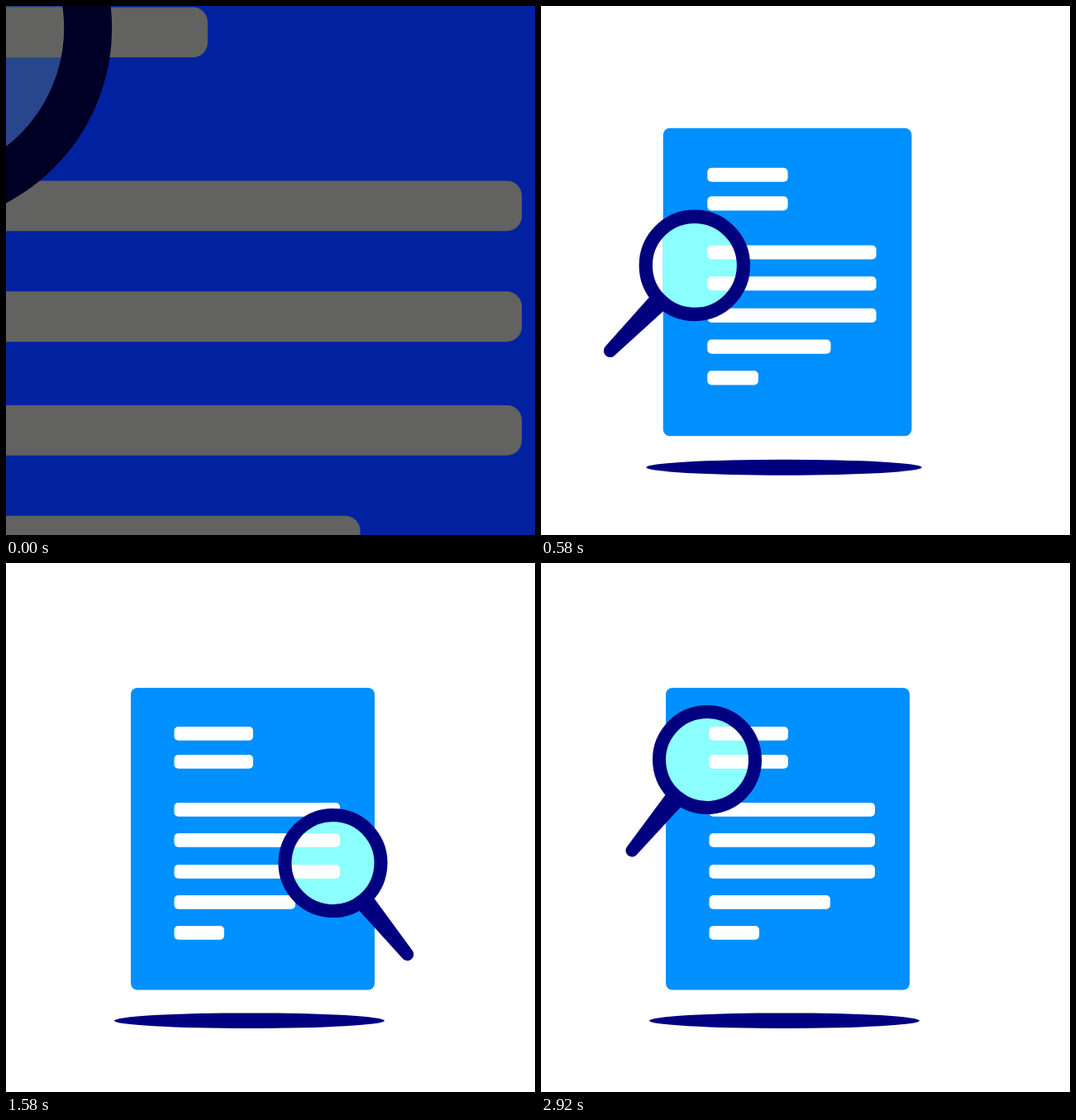
These frames come from a looping animation (640 by 640 pixels, 3010 ms). An HTML page with a canvas:

```html
<!DOCTYPE html>
<html lang="en">
<head>
<meta charset="utf-8">
<title>Document search</title>
<style>
html, body { margin: 0; width: 100%; height: 100%; overflow: hidden; background: #fff; }
canvas { display: block; width: 100vmin; height: 100vmin; }
</style>
</head>
<body>
<canvas id="stage" width="640" height="640"></canvas>
<script>
const ctx = document.getElementById('stage').getContext('2d');
const LOOP = 3010, STEP = 83.33, LAST = 35;

// Text bars: top, width
const bars = [[198, 96], [232, 96], [290, 201], [327, 201], [365, 201], [402, 147], [439, 61]];

// Magnifier poses: step, x, y, handle angle in degrees
const poses = [
  [0, 201, 239, 39.6], [3, 176, 275.5, 43.7], [7, 188.4, 314, 44.7],
  [11, 199.5, 317, 42.9], [14, 376, 345, -31], [17, 399, 360, -40.8],
  [19, 395.5, 363, -39.2], [21, 340, 310, -16], [24, 233, 245, 28],
  [28, 203, 238, 38.5], [35, 201, 238, 39.6]
];

// Colour pairs: lit (may exceed 255 for a quick rise to full), dim
const palette = {
  paper: [[280, 280, 280], [98, 98, 96]],
  sheet: [[0, 144, 271], [0, 34, 160]],
  lens: [[140, 256, 275], [40, 70, 140]],
  ink: [[0, 0, 128], [0, 0, 38]]
};

function slope(i, k) {
  if (i === 0 || i === poses.length - 1) return 0;
  const rate = j => (poses[j + 1][k] - poses[j][k]) / (poses[j + 1][0] - poses[j][0]);
  const a = rate(i - 1), b = rate(i);
  return a * b > 0 ? 2 * a * b / (a + b) : 0;
}

// Monotone cubic interpolation of pose column k
function poseAt(step, k) {
  const i = Math.max(0, poses.findIndex(p => p[0] >= step) - 1);
  const p = poses[i], q = poses[i + 1], span = q[0] - p[0];
  const u = (step - p[0]) / span, v = 1 - u;
  return v * v * (1 + 2 * u) * p[k] + u * u * (3 - 2 * u) * q[k]
    + span * u * v * (v * slope(i, k) - u * slope(i + 1, k));
}

function roundBox(x, y, w, h, r) {
  ctx.beginPath();
  ctx.roundRect(x, y, w, h, r);
  ctx.fill();
}

function draw(step) {
  const intro = step < 9 ? Math.exp(-0.66 * step - 0.006 * step * step) : 0;
  const scale = 1 + 2.62 * intro;
  const color = name => {
    const [lit, dim] = palette[name];
    return `rgb(${lit.map((c, i) => Math.min(255, Math.round(c + (dim[i] - c) * intro)))})`;
  };
  const [x, y, angle] = [1, 2, 3].map(k => poseAt(step, k));

  ctx.setTransform(1, 0, 0, 1, 0, 0);
  ctx.fillStyle = color('paper');
  ctx.fillRect(0, 0, 640, 640);
  ctx.translate(320, 320);
  ctx.scale(scale, scale);
  ctx.translate(-320, -320);

  ctx.fillStyle = color('ink');
  ctx.beginPath();
  ctx.ellipse(294.5, 553.7, 163.5, 9.3, 0, 0, 7);
  ctx.fill();

  ctx.fillStyle = color('sheet');
  roundBox(151, 151, 295, 365.5, 8);

  // The lens tints only the sheet
  ctx.save();
  ctx.beginPath();
  ctx.arc(x, y, 58, 0, 7);
  ctx.clip();
  ctx.fillStyle = color('lens');
  roundBox(151, 151, 295, 365.5, 8);
  ctx.restore();

  ctx.fillStyle = color('paper');
  for (const [top, width] of bars) roundBox(203.5, top, width - 0.5, 16.8, 5);

  ctx.translate(x, y);
  ctx.rotate(angle * Math.PI / 180);
  ctx.fillStyle = ctx.strokeStyle = color('ink');
  ctx.lineWidth = 16;
  ctx.beginPath();
  ctx.arc(0, 0, 58, 0, 7);
  ctx.stroke();
  ctx.beginPath();
  ctx.moveTo(-12, 60);
  ctx.lineTo(12, 60);
  ctx.lineTo(7.7, 142);
  ctx.arc(0, 142.5, 7.7, 0, Math.PI);
  ctx.fill();
}

function tick() {
  const t = performance.now() % LOOP;
  draw(Math.min(LAST, Math.floor((t + 5) / STEP)));
  requestAnimationFrame(tick);
}
tick();
</script>
</body>
</html>
```
